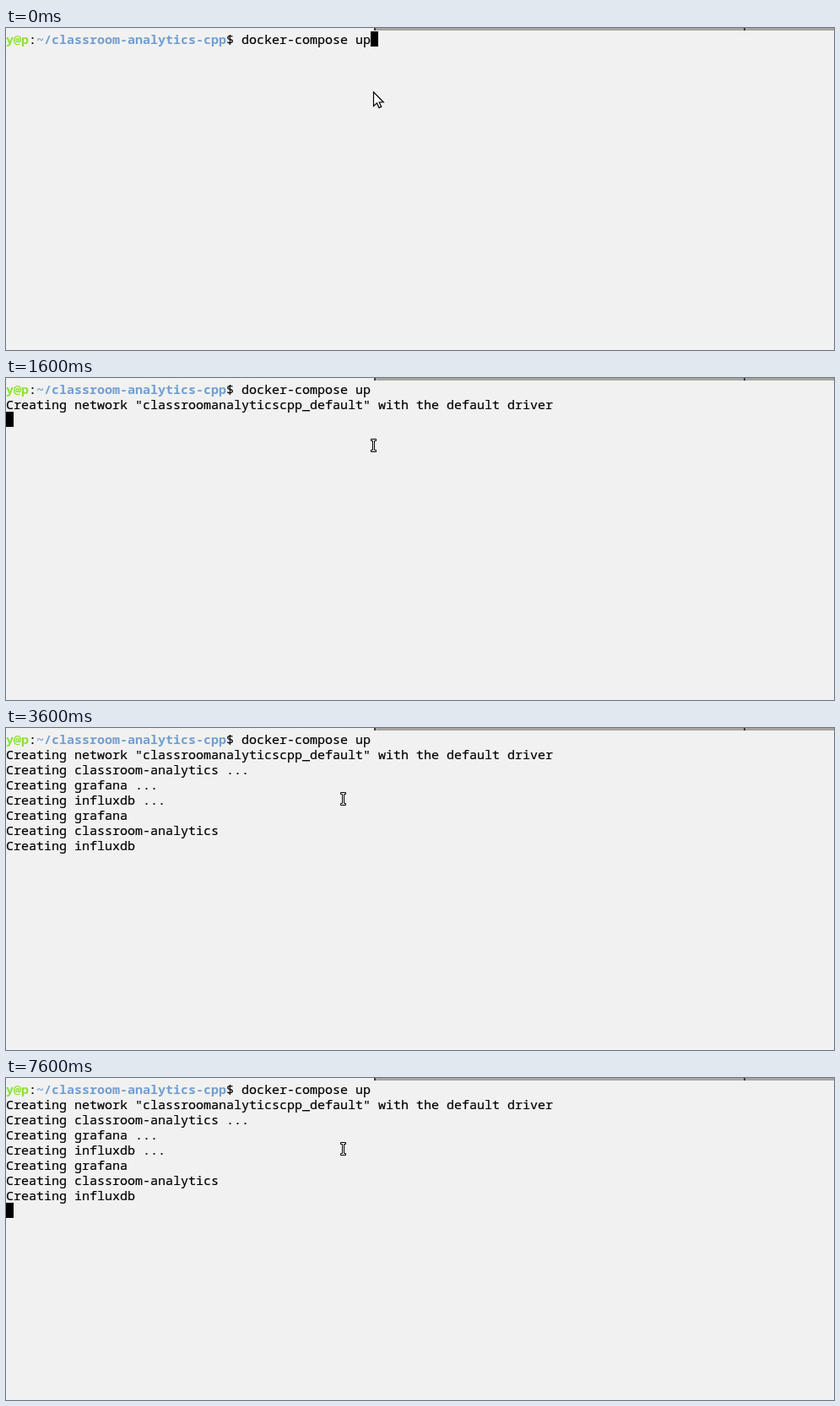
Animation of 981x382 px, one loop 8 s. Source, as an HTML page:

```html
<!DOCTYPE html>
<html lang="en">
<head>
<meta charset="utf-8">
<title>Terminal</title>
<style>
  html, body { margin: 0; width: 100%; height: 100%; overflow: hidden; background: #f1f1f1; }
  svg { display: block; width: 981px; height: 382px; }
  text { font: 15px "Noto Sans Mono", monospace; white-space: pre; fill: #000; stroke: #000; stroke-width: .2; }
  .bold { font-weight: 700; stroke: none; }
  .user { fill: #8ae234; }
  .path { fill: #729fcf; }
</style>
</head>
<body>
<svg viewBox="0 0 981 382">
  <rect width="981" height="382" fill="#f1f1f1"/>
  <rect x="436" width="545" height="3" fill="#a8a49f"/>
  <path d="M436 0h2v3h-2zM874 0h2v3h-2z" fill="#3c3b37"/>
  <text x="0" y="19"><tspan class="bold user">y@p</tspan>:<tspan class="bold path">~/classroom-analytics-cpp</tspan>$ docker-compose up</text>
  <g id="output"></g>
  <rect id="caret" width="9" height="18"/>
  <path id="arrow" d="M435.5 76v16.6l3.9-3.6 2.6 5.6 2.7-1.2-2.5-5.4h5z" fill="#fff" stroke="#000" stroke-width="1.2"/>
  <path id="beam" d="M-3.5-7.5h6v2h-2v11h2v2h-6v-2h2v-11h-2z" fill="#fff" stroke="#000"/>
</svg>
<script>
const LOOP = 8000, ROW = 18, COL = 9, BLINK = 600;
const NETWORK = 1600, SERVICES = 2000, POINTER = 100;
const $ = id => document.getElementById(id);

const lines = [
  'Creating network "classroomanalyticscpp_default" with the default driver',
  'Creating classroom-analytics ...',
  'Creating grafana ...',
  'Creating influxdb ...',
  'Creating grafana',
  'Creating classroom-analytics',
  'Creating influxdb'
];

const rows = lines.map((line, i) => {
  const el = document.createElementNS('http://www.w3.org/2000/svg', 'text');
  el.setAttribute('x', 0);
  el.setAttribute('y', 19 + ROW * (i + 1));
  el.textContent = line;
  $('output').append(el);
  return el;
});

const show = (el, on) => el.setAttribute('visibility', on ? 'visible' : 'hidden');
const progress = (t, from, to) => Math.min(1, Math.max(0, (t - from) / (to - from)));

// The pointer drifts down a little, then glides left and slows to a stop.
function pointerAt(t) {
  const step = Math.floor(t / 200) * 200;
  const drift = progress(step, 1200, 1600);
  const glide = 1 - (1 - progress(step, 3000, 3600)) ** 1.6;
  return [438 - 2 * drift - 36 * glide, 78 + 2 * drift + 4 * glide].map(Math.round);
}

function draw(t) {
  const count = t < NETWORK ? 0 : t < SERVICES ? 1 : lines.length;
  rows.forEach((el, i) => show(el, i < count));

  show($('caret'), t < POINTER || Math.floor((t - 400) / BLINK) % 2 === 0);
  $('caret').setAttribute('x', count ? 0 : 48 * COL);
  $('caret').setAttribute('y', 4 + ROW * (count ? count + 1 : 0));

  show($('arrow'), t < POINTER);
  show($('beam'), t >= POINTER);
  $('beam').setAttribute('transform', `translate(${pointerAt(t)})`);
}

const start = performance.now();
function tick() {
  draw((performance.now() - start) % LOOP);
  requestAnimationFrame(tick);
}
draw(0);
requestAnimationFrame(tick);
</script>
</body>
</html>
```
